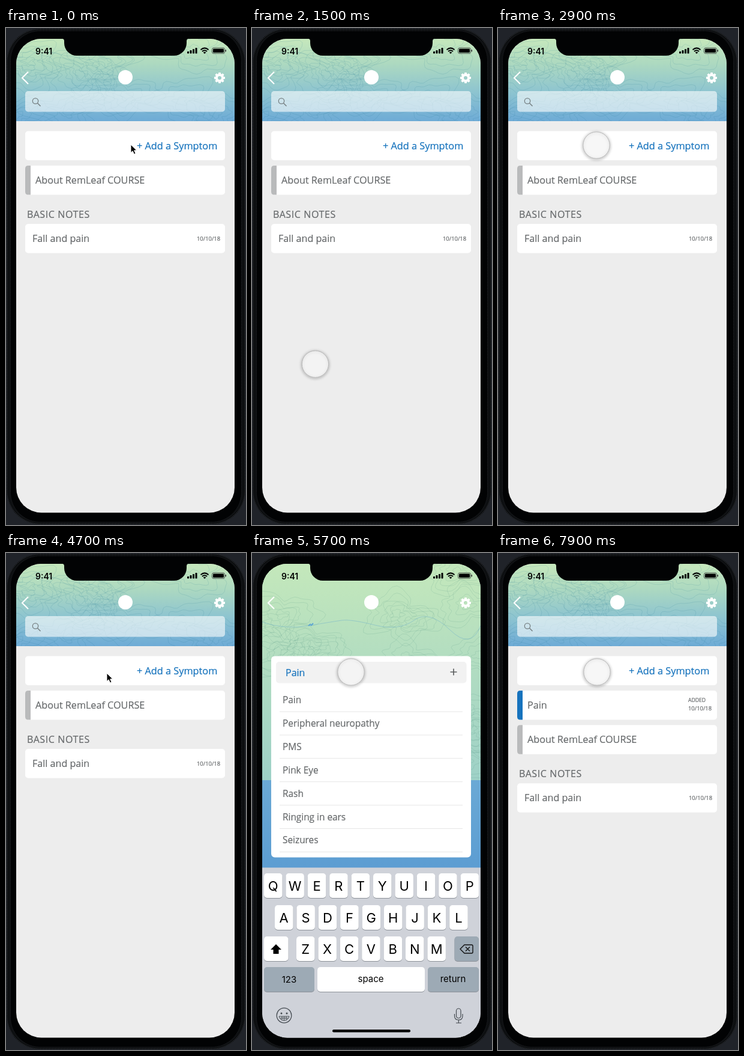
Animation of 400x827 px, one loop 8000 ms. Source, as an HTML page:

```html
<!DOCTYPE html>
<html lang="en">
<head>
<meta charset="utf-8">
<title>Symptom diary</title>
<style>
  html, body { margin: 0; width: 100%; height: 100%; overflow: hidden; background: #202329; }
  svg { display: block; width: 400px; height: 827px; }
  text { font-family: "Open Sans", "Noto Sans", sans-serif; stroke-width: .2px; }
  .ui { font-family: Inter, Roboto, sans-serif; }
</style>
</head>
<body>
<svg id="stage" viewBox="0 0 400 827"></svg>
<script>
const LOOP = 8000, GREY = '#66696b', BLUE = '#1673bd';

let seed = 7;
const random = () => (seed = seed * 16807 % 2147483647) / 2147483647;
const rect = (x, y, w, h, r, fill, extra = '') =>
  `<rect x="${x}" y="${y}" width="${w}" height="${h}" rx="${r}" fill="${fill}" ${extra}/>`;
const path = (d, stroke, width, extra = '') =>
  `<path d="${d}" fill="none" stroke="${stroke}" stroke-width="${width}" ${extra}/>`;
const text = (x, y, size, label, fill = GREY, extra = '') =>
  `<text x="${x}" y="${y}" font-size="${size}" fill="${fill}" stroke="${fill}" ${extra}>${label}</text>`;
const uiText = (x, y, size, label) =>
  `<text class="ui" x="${x}" y="${y}" font-size="${size}" text-anchor="middle">${label}</text>`;
const gradient = (id, stops) => `<linearGradient id="${id}" x2="0" y2="1">` +
  stops.map(([at, color]) => `<stop offset="${at}" stop-color="${color}"/>`).join('') + '</linearGradient>';

// Nested wobbly rings that read as a contour map
function contours(height, hills, color) {
  let d = '';
  for (let i = 0; i < hills; i++) {
    const cx = 17 + random() * 364, cy = 18 + random() * height, phase = random() * 9;
    for (let r = 8; r < 46; r += 8 + random() * 6) {
      for (let k = 0; k <= 60; k++) {
        const a = k / 60 * 2 * Math.PI;
        const q = r * (1 + .24 * Math.sin(3 * a + phase) + .16 * Math.sin(5 * a + 2 * phase + r / 20)
          + .07 * Math.sin(11 * a + phase));
        d += (k ? 'L' : 'M') + (cx + 1.3 * q * Math.cos(a)).toFixed(1) + ' ' + (cy + .8 * q * Math.sin(a)).toFixed(1);
      }
    }
  }
  return path(d, color, .5, 'opacity=".28"');
}

function navigation() {
  let teeth = '';
  for (let i = 0; i < 8; i++) teeth += rect(354, 74, 4, 5, 1, '#fff', `transform="rotate(${i * 45} 356 83)"`);
  return path('M37 73L27 83L37 93', '#fff', 2.2) + '<circle cx="199" cy="82" r="12" fill="#fff"/>' +
    teeth + '<circle cx="356" cy="83" r="5" fill="none" stroke="#fff" stroke-width="4"/>';
}

const card = (y, bar) => rect(32, y, 333, 48.5, 5, '#fff') +
  (bar ? `<path d="M41 ${y}H37Q32 ${y} 32 ${y + 5}V${y + 43.5}Q32 ${y + 48.5} 37 ${y + 48.5}H41Z" fill="${bar}"/>` : '');

const listScreen = () =>
  rect(17, 18, 364, 789, 0, '#ededed') + rect(17, 18, 364, 137, 0, 'url(#sky)') +
  `<g clip-path="url(#top)">${contours(137, 12, '#176b8d')}</g>` + navigation() +
  rect(32, 105, 333, 34.5, 5, '#fff', 'opacity=".6"') +
  '<circle cx="49" cy="121.500" r="4.700" fill="none" stroke="#778083" stroke-width="1.300"/>' +
  path('M52.500 125L57.500 130', '#778083', 1.5) +
  card(171.5) + text(218, 202, 16.3, '+ Add a Symptom', BLUE) +
  `<g id="added">${card(229, BLUE)}${text(49, 259, 16.2, 'Pain')}
   ${text(317, 248, 8.6, 'ADDED')}${text(317, 262, 9.4, '10/10/18')}</g>
   <g id="rest">${card(229, '#b9babb')}${text(49, 259, 16.2, 'About RemLeaf COURSE')}
   ${text(35, 316, 16, 'BASIC NOTES', GREY, 'letter-spacing=".6"')}${card(326)}${text(44, 356, 16.1, 'Fall and pain')}
   ${text(318, 354, 9.4, '10/10/18')}</g>`;

const key = (x, y, w, fill = '#fff') => rect(x, y + 1, w, 41, 5, '#8d9299') + rect(x, y, w, 41, 5, fill);

function keyboard() {
  let s = rect(17, 523.5, 364, 284, 0, '#cfd2d9');
  [['QWERTYUIOP', 20, 533], ['ASDFGHJKL', 38, 586], ['ZXCVBNM', 74, 638]].forEach(([letters, x, y]) =>
    [...letters].forEach((c, i) => s += key(x + i * 36.4, y, 30.5) + uiText(x + 15.2 + i * 36.4, y + 29, 22, c)));
  const dark = '#9daab5';
  return s + key(20, 638, 40.5) + key(337.5, 638, 40.5, dark) +
    '<path d="M40 651L49 660H44.500V667H35.500V660H31Z"/>' +
    path('M347 659L354 652H366Q368 652 368 654V664Q368 666 366 666H354ZM356 655.500L363 662.500M363 655.500L356 662.500', '#111', 1.4) +
    key(20, 689, 84, dark) + uiText(62, 715, 15, '123') +
    key(109, 689, 179) + uiText(198, 714, 15, 'space') +
    key(293, 689, 85, dark) + uiText(335, 714, 15, 'return') +
    '<circle cx="53.500" cy="769.500" r="12.300" fill="none" stroke="#444a50" stroke-width="1.300"/>' +
    '<circle cx="49" cy="766" r="1.500" fill="#444a50"/><circle cx="58" cy="766" r="1.500" fill="#444a50"/>' +
    path('M45 771H62Q60 778 53.500 778T45 771M47 774H60M50 771V777M53.500 771V778M57 771V777', '#444a50', 1) +
    rect(340.5, 758, 7.5, 16, 3.7, 'none', 'stroke="#444a50" stroke-width="1.200"') +
    path('M337.500 767V770Q337.500 777 344.300 777T351 770V767M344.300 777V782M340 782H349', '#444a50', 1.2) +
    rect(134, 793, 130, 4.5, 2.2, '#000');
}

function pickerScreen() {
  const names = ['Pain', 'Peripheral neuropathy', 'PMS', 'Pink Eye', 'Rash', 'Ringing in ears', 'Seizures'];
  return rect(17, 18, 364, 360, 0, 'url(#land)') + rect(17, 378, 364, 146, 0, 'url(#sea)') +
    `<g clip-path="url(#map)">${contours(360, 26, '#347c70')}</g>` +
    path('M17 115Q55 128 95 121T150 112T205 120T270 112T330 128T381 121', '#6daec8', .8, 'opacity=".6"') +
    path('M94 121L98 118M98 121L102 117', '#5ba4d3', 2) +
    navigation() + rect(32, 171.5, 333, 335, 6, '#fff') + rect(40, 181, 317.5, 35.5, 5, '#f2f2f2') +
    text(56, 204.5, 16, 'Pain', BLUE) + path('M330.500 198H341.500M336 192.500V203.500', '#5d6061', 1.7) +
    names.map((name, i) => text(51, 250 + i * 38.9, 15.4, name) +
      path(`M46 ${264 + i * 38.9}H351`, '#e6e6e6', 1)).join('') + keyboard();
}

const statusBar = () =>
  '<path d="M94 18Q97 18 97 22V25A21 21 0 0 0 118 46H280A21 21 0 0 0 301 25V22Q301 18 304 18Z" fill="#020304"/>' +
  '<text class="ui" x="49" y="43.500" font-size="14" font-weight="600">9:41</text>' +
  [0, 1, 2, 3].map(i => rect(302 + i * 4.5, 39 - i * 2, 3, 3.5 + i * 2, .8, '#000')).join('') +
  path('M324.500 36.300Q331 30.500 337.500 36.300M327 39Q331 35.500 335 39', '#000', 2) +
  '<path d="M328.700 40.700Q331 38.800 333.300 40.700L331 43Z"/>' +
  rect(343.5, 33, 21, 9.5, 2.5, 'none', 'stroke="#333" stroke-width=".8"') +
  rect(345, 34.5, 18, 6.5, 1.3, '#000') + rect(365.5, 36, 1.5, 3.5, .7, '#333');

const shell = () => rect(0, 0, 400, 827, 0, '#202329') + rect(1, 1, 398, 825, 56, '#0d0f11') +
  rect(7.5, 4.5, 385, 818, 50, '#020304') +
  [[1.5, '#4a4d52'], [7.5, '#303236']].map(([d, c]) =>
    rect(d, d / 2 + 1, 400 - 2 * d, 825 - d, 57 - d, 'none', `stroke="${c}" stroke-dasharray="1 1.500"`)).join('');

const stage = document.getElementById('stage');
stage.innerHTML = `<defs>
  ${gradient('sky', [[0, '#c6e8bc'], [.3, '#add9c0'], [.65, '#8dc4d0'], [1, '#6eabd6']])}
  ${gradient('land', [[0, '#c4e8bb'], [.4, '#b4dec0'], [1, '#9ed1c7']])}
  ${gradient('sea', [[0, '#6ba9d5'], [1, '#5c9dd2']])}
  <clipPath id="screen">${rect(17, 18, 364, 788.5, 42, '#000')}</clipPath>
  <clipPath id="top">${rect(17, 18, 364, 137, 0, '#000')}</clipPath>
  <clipPath id="map">${rect(17, 18, 364, 360, 0, '#000')}</clipPath>
  <filter id="soft" x="-50%" y="-50%" width="200%" height="200%"><feGaussianBlur stdDeviation="2"/></filter>
  </defs>${shell()}
  <g clip-path="url(#screen)">${listScreen()}<g id="picker">${pickerScreen()}</g>${statusBar()}</g>
  <g id="touch"><circle id="shadow" r="22" cy="1" fill="none" stroke="#000" stroke-opacity=".3" stroke-width="3" filter="url(#soft)"/>
  <circle id="disc" r="22.200"/></g>
  <path id="arrow" d="M0 0V13.500L3.200 10.700L5.500 16L8 15L5.700 9.800H10Z" stroke="#fff" stroke-width="1"/>`;

const [picker, added, rest, touch, shadow, disc, arrow] =
  ['picker', 'added', 'rest', 'touch', 'shadow', 'disc', 'arrow'].map(id => document.getElementById(id));

const route = [[0, 208, 194], [300, 208, 194], [1150, 102, 598], [1370, 102, 598], [2150, 148, 82],
  [2700, 164, 195], [4200, 164, 196], [4600, 168, 200], [5100, 168, 200], [5350, 165, 198], [LOOP, 165, 198]];
const ramp = (t, from, to) => Math.min(1, Math.max(0, (t - from) / (to - from)));

function pointer(t) {
  const i = route.findIndex(p => p[0] > t), [t0, x0, y0] = route[i - 1], [t1, x1, y1] = route[i];
  const u = ramp(t, t0, t1), e = u * u * (3 - 2 * u);
  return `translate(${x0 + (x1 - x0) * e} ${y0 + (y1 - y0) * e})`;
}

function draw(now) {
  const t = now % LOOP;
  const isArrow = t < 900 || (t >= 4200 && t < 5200);
  const pressed = t >= 7350 && t < 7700;
  const done = t >= 7400;
  picker.setAttribute('opacity', ramp(t, 5000, 5300) * (1 - ramp(t, 7550, 7850)));
  added.setAttribute('visibility', done ? 'visible' : 'hidden');
  rest.setAttribute('transform', `translate(0 ${done ? 57.3 : 0})`);
  arrow.setAttribute('visibility', isArrow ? 'visible' : 'hidden');
  touch.setAttribute('visibility', isArrow ? 'hidden' : 'visible');
  shadow.setAttribute('opacity', pressed ? 0 : 1);
  disc.setAttribute('fill', pressed ? 'rgba(205,206,216,.5)' : 'rgba(246,246,246,.8)');
  disc.setAttribute('stroke', pressed ? '#b6b6c0' : '#b9b9b9');
  for (const el of [touch, arrow]) el.setAttribute('transform', pointer(t));
  requestAnimationFrame(draw);
}
requestAnimationFrame(draw);
</script>
</body>
</html>
```
